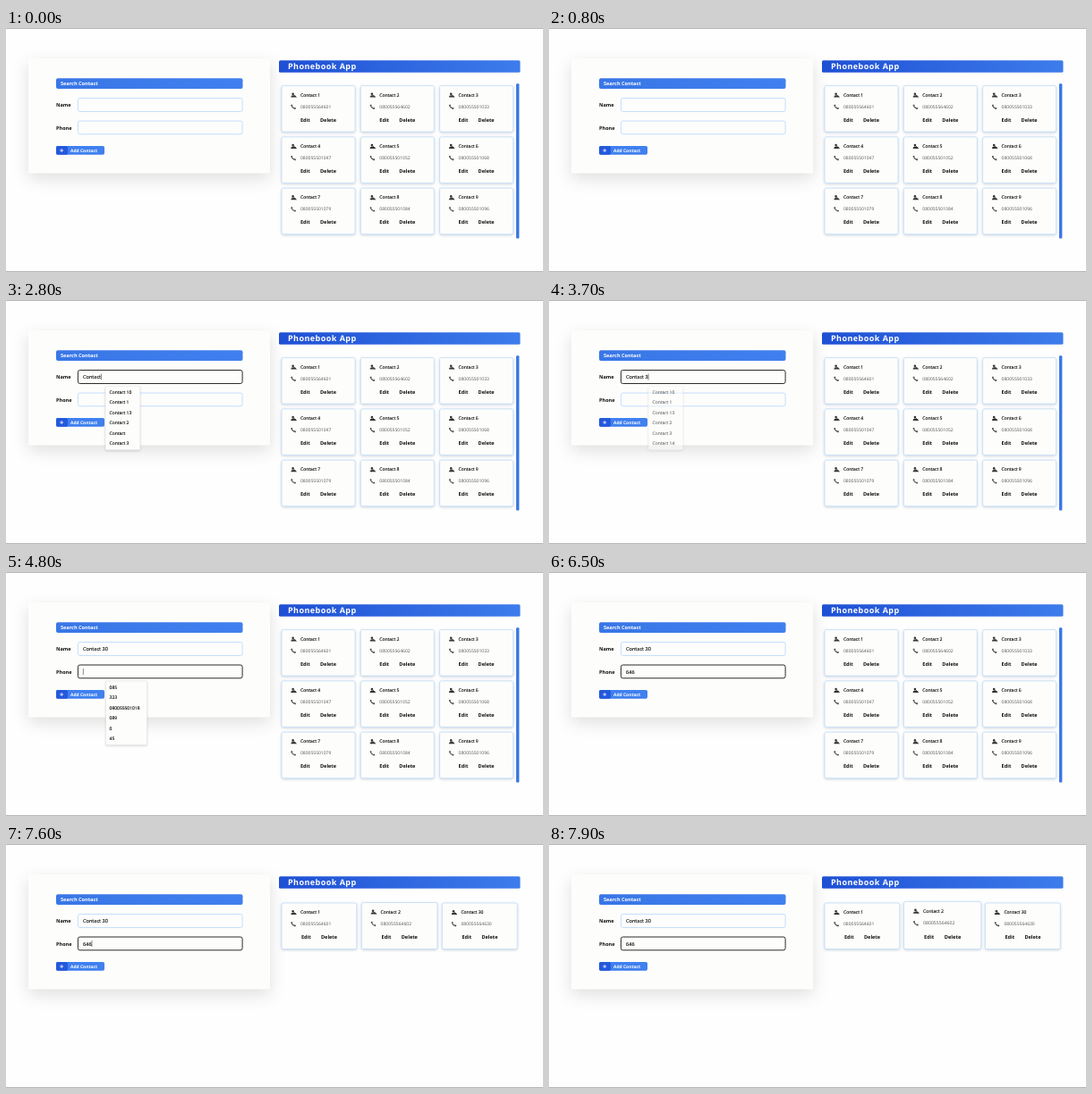
An HTML page for the animation above (8000 ms loop, 600 px wide and 273 px high).

```html
<!DOCTYPE html>
<html lang="en">
<head>
<meta charset="utf-8">
<title>Phonebook App</title>
<style>
  html, body { margin: 0; width: 100%; height: 100%; overflow: hidden; background: #fefefe; }
  svg { display: block; width: 100%; height: 100%; }
  text { font-family: "Open Sans", "Noto Sans", sans-serif; font-size: 5px; fill: #111; stroke: #111; stroke-width: .14; white-space: pre; text-rendering: geometricPrecision; }
  .bold { font-weight: 700; font-size: 5.55px; stroke: none; }
  .white { fill: #fff; }
  .head { font-size: 9px; letter-spacing: .45px; }
  .small { font-size: 4.95px; }
  .value { font-size: 5.6px; }
  .number { fill: #555; stroke: none; }
  .field { fill: #fdfdfc; stroke: #bfdbfe; stroke-width: .9; }
  .field.focus { stroke: #2b2b2b; stroke-width: 1; }
  .card { fill: #fdfdfc; stroke: #c3ddf8; stroke-width: .8; filter: drop-shadow(0 1.5px 1.5px rgba(40, 80, 120, .24)); }
  .panel { fill: #fdfdfc; filter: drop-shadow(0 6px 9px rgba(0, 0, 0, .12)); }
  .list { fill: #fdfdfc; stroke: #e2e2e0; stroke-width: .6; filter: drop-shadow(0 1px 1px rgba(0, 0, 0, .14)); }
</style>
</head>
<body>
<svg id="stage" viewBox="0 0 600 273"></svg>
<script>
const LOOP = 8000;
const nameKeys = [[0, ""], [1100, ""], [1500, "C"], [1600, "Co"], [1700, "Con"], [1900, "Cont"],
  [2400, "Contac"], [2800, "Contact"], [3400, "Contact "], [3600, "Contact 3"], [3800, "Contact 30"]];
const phoneKeys = [[0, ""], [4800, ""], [5700, "6"], [5800, "64"], [5900, "646"]];
const numbers = ["080055564601", "080055564602", "080055501033", "080055501047", "080055501052",
  "080055501068", "080055501079", "080055501084", "080055501096"];

const text = (x, y, s, cls = "", id = "") => `<text x="${x}" y="${y}" class="${cls}" id="${id}">${s}</text>`;
const rect = (x, y, w, h, r, attrs) => `<rect x="${x}" y="${y}" width="${w}" height="${h}" rx="${r}" ${attrs}/>`;

function card(x, y, w, label, number, shift = 0, id = "") {
  return `<g id="${id}"><g transform="translate(${x} ${y})">
    ${rect(0, 0, w, 51.5, 2, 'class="card"')}
    <g fill="#333"><circle cx="12.6" cy="9.2" r="1.3"/><path d="M10.2 13q.2-2.3 2.6-2.3 2.6 0 4.2 2.3z"/>
      <path d="M13.4 10.2l2.8 2.2" stroke="#333" stroke-width=".8"/></g>
    <path d="M11 21.3q.5 3.6 4.3 4.3" stroke="#555" stroke-width="1.1" fill="none"/>
    <path d="M10.9 21.4l.8 1.2M14.3 25l1.3.7" stroke="#555" stroke-width="1.8"/>
    ${text(21, 12.3, label)}
    ${text(21, 25, number, "number")}
    ${text(21 + shift, 40.2, "Edit", "bold")}
    ${text(43 + shift, 40.2, "Delete", "bold")}
  </g></g>`;
}

function list(id, x, y, w, rows) {
  return `<g id="${id}">${rect(x, y, w, 71.5, 1, 'class="list"')}` +
    rows.map((s, i) => text(115.6, y + 8.5 + i * 11.5, s, "small", id + i)).join("") + "</g>";
}

const gradient = (id, a, b) =>
  `<linearGradient id="${id}"><stop stop-color="${a}"/><stop offset="1" stop-color="${b}"/></linearGradient>`;

stage.innerHTML = `<defs>${gradient("deep", "#1f50d4", "#3d7ceb")}${gradient("light", "#3976e6", "#4080ee")}</defs>
  <path d="M0 .5H600M0 272.5H600" stroke="#b5b5b5"/>
  ${rect(25, 34, 270, 128.5, 1, 'class="panel"')}
  ${rect(56, 56.3, 208.5, 11.8, 2, 'fill="url(#light)"')}
  ${text(61, 64.3, "Search Contact", "bold white")}
  ${text(56, 88, "Name", "bold")}
  ${text(56, 113.5, "Phone", "bold")}
  ${rect(80.4, 78.5, 183.7, 15, 2.2, 'id="nameBox"')}
  ${rect(80.4, 104, 183.7, 14.8, 2.2, 'id="phoneBox"')}
  ${text(86, 88, "", "value", "nameText")}
  ${text(86, 113.5, "", "value", "phoneText")}
  <path id="caret" d="M.3 0v7" stroke="#333" stroke-width=".6"/>
  ${rect(56, 132, 54, 9.8, 1.8, 'fill="#4080ef"')}
  ${rect(56, 132, 13, 9.8, 1.8, 'fill="#2459dc"')}
  <path d="M60.2 137h4M62.2 135v4" stroke="#fff" stroke-width=".8"/>
  ${text(72, 138.8, "Add Contact", "bold white small")}
  ${list("nameList", 111, 96.3, 38.8, ["Contact 10", "Contact 1", "Contact 13", "Contact 2", "", ""])}
  ${list("phoneList", 111.5, 122, 46, ["085", "323", "080055501018", "089", "0", "45"])}
  ${rect(305, 36.2, 269.5, 13.6, 1.5, 'fill="url(#deep)"')}
  ${text(315, 46.3, "Phonebook App", "bold white head")}
  <g id="all">
    ${numbers.map((n, i) => card(308 + i % 3 * 88.3, 64.6 + Math.floor(i / 3) * 57.3, 82, "Contact " + (i + 1), n)).join("")}
    ${rect(570, 62.3, 3.4, 173.3, 1, 'fill="#3c78e4"')}
  </g>
  <g id="found">
    ${card(308, 66, 83.8, "Contact 1", numbers[0], 1)}
    ${card(397.7, 66, 83.8, "Contact 2", numbers[1], 1, "hovered")}
    ${card(487.4, 66, 83.8, "Contact 30", "080055564630", 1)}
  </g>`;

const $ = id => document.getElementById(id);
const clamp = v => Math.min(1, Math.max(0, v));
const show = (id, on) => $(id).setAttribute("visibility", on ? "visible" : "hidden");
const last = (keys, t) => keys.filter(k => k[0] <= t).pop();

function draw(t) {
  const name = last(nameKeys, t), phone = last(phoneKeys, t);
  const onPhone = t >= 4800, onName = t >= 1100 && !onPhone;
  $("nameText").textContent = name[1];
  $("phoneText").textContent = phone[1];
  $("nameBox").setAttribute("class", onName ? "field focus" : "field");
  $("phoneBox").setAttribute("class", onPhone ? "field focus" : "field");

  const key = onPhone ? phone : name;
  const width = key[1] ? $(onPhone ? "phoneText" : "nameText").getComputedTextLength() : 0;
  $("caret").setAttribute("transform", `translate(${86 + width} ${onPhone ? 108 : 82.5})`);
  show("caret", (onName || onPhone) && (t - key[0]) % 1200 < 600);

  const filtered = t >= 3400;
  $("nameList4").textContent = filtered ? "Contact 3" : "Contact";
  $("nameList5").textContent = filtered ? "Contact 14" : "Contact 3";
  $("nameList").setAttribute("opacity", clamp((t - 1580) / 100) * clamp((3800 - t) / 180));
  $("phoneList").setAttribute("opacity", t < 4800 ? 0 : clamp((5900 - t) / 200));

  show("all", t < 6600);
  show("found", t >= 6600);
  const p = clamp((t - 7430) / 450), lift = p * p * (3 - 2 * p);
  $("hovered").setAttribute("transform",
    `translate(439.6 ${91.8 - .8 * lift}) scale(${1 + .03 * lift}) translate(-439.6 -91.8)`);
}

const start = performance.now();
function tick() {
  draw((performance.now() - start) % LOOP);
  requestAnimationFrame(tick);
}
tick();
</script>
</body>
</html>
```
